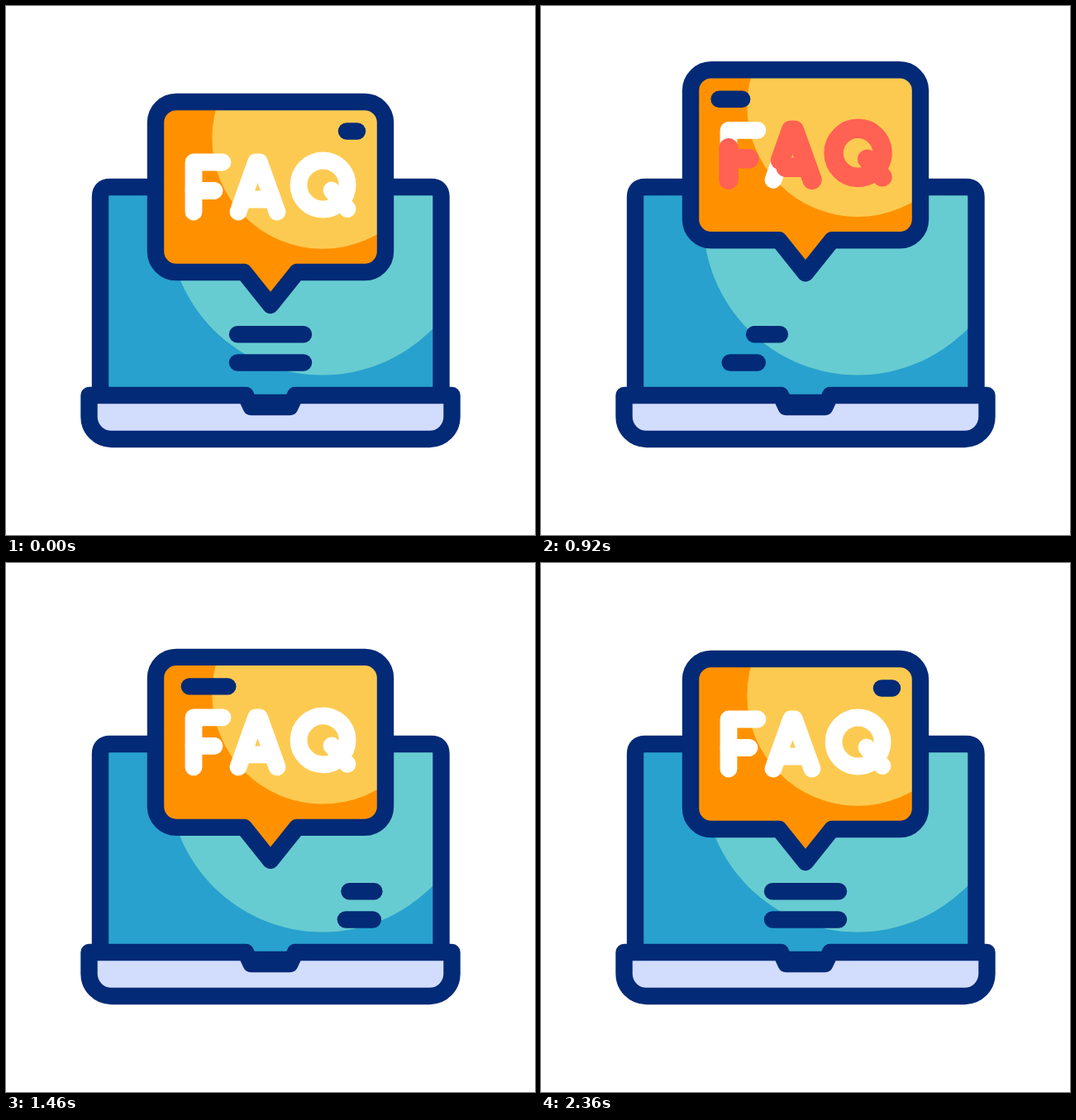
Animation, 640 px wide and 640 px high, one loop 2.4 s. Source, as an HTML page:

```html
<!DOCTYPE html>
<html lang="en">
<head>
<meta charset="utf-8">
<title>FAQ laptop</title>
<style>
  html, body { margin: 0; width: 100%; height: 100%; overflow: hidden; background: #fff; }
  svg { display: block; width: 100%; height: 100%; }
  .line { fill: none; stroke: #032a76; stroke-width: 20.4; stroke-linecap: round; stroke-linejoin: round; }
  #white, #pink { fill: none; stroke: #fff; stroke-width: 20.8; stroke-linecap: round; stroke-linejoin: round; }
  #pink { stroke: #ff6152; stroke-width: 23.4; }
</style>
</head>
<body>
<svg viewBox="0 0 640 640">
  <defs>
    <path id="screenShape" d="M114 480V231Q114 219 126 219H514.500Q526.500 219 526.500 231V480Z"/>
    <path id="bubbleShape" d="M206 116H434A25 25 0 0 1 459 141V297A25 25 0 0 1 434 322H352L320 362L288 322H206A25 25 0 0 1 181 297V141A25 25 0 0 1 206 116Z"/>
    <clipPath id="screenClip"><use href="#screenShape"/></clipPath>
    <clipPath id="bubbleClip"><use href="#bubbleShape"/></clipPath>
  </defs>

  <g clip-path="url(#screenClip)">
    <rect x="104" y="209" width="433" height="280" fill="#28a1ce"/>
    <circle cx="383" cy="260" r="186.500" fill="#67ccd1"/>
  </g>
  <use href="#screenShape" class="line"/>
  <path class="line" fill="none" style="fill:#d2dcfd"
    d="M100.500 471H290L296.500 485H343.500L350 471H539.500V497A27 27 0 0 1 512.500 524H127.500A27 27 0 0 1 100.500 497Z"/>
  <path id="line1" class="line"/>
  <path id="line2" class="line"/>

  <g id="bubble">
    <g clip-path="url(#bubbleClip)">
      <rect x="171" y="106" width="298" height="270" fill="#ff9100"/>
      <circle cx="383" cy="160" r="133.700" fill="#fdca51"/>
    </g>
    <use href="#bubbleShape" class="line"/>
    <path id="bar" class="line"/>
    <g id="white"></g>
    <g id="pink"></g>
  </g>
</svg>
<script>
const LOOP = 2400;
const byId = id => document.getElementById(id);

// Cubic bezier easing (x1, 0, x2, 1), solved by bisection.
const bezier = (x1, x2) => x => {
  let lo = 0, hi = 1, u;
  for (let i = 0; i < 24; i++) {
    u = (lo + hi) / 2;
    const v = 1 - u;
    if (3 * v * v * u * x1 + 3 * v * u * u * x2 + u * u * u < x) lo = u; else hi = u;
  }
  return u * u * (3 - 2 * u);
};
const sine = x => Math.sin(x * Math.PI / 2) ** 2;
const swift = bezier(.575, .13);
const clamp = x => Math.min(1, Math.max(0, x));

// Moves are [start, end, target, ease], in order of time.
const track = (from, ...moves) => t => moves.reduce(
  (v, [start, end, to, ease = swift]) => t <= start ? v : v + (to - v) * ease(clamp((t - start) / (end - start))),
  from);

const bubbleY = track(0,
  [200, 740, -45, bezier(.58, .5)],
  [740, 1400, -1, bezier(.55, .25)],
  [1400, 1800, -21, sine],
  [1800, 2160, 0, sine]);

const bars = [
  { el: byId("bar"), y: 151.5,
    left: track(412, [0, 1120, 212, bezier(.7, .15)], [1120, 2350, 412, bezier(.86, .31)]),
    right: track(425, [0, 1120, 239, bezier(.907, .21)], [1120, 2350, 425]) },
  { el: byId("line1"), y: 397.3,
    left: track(280, [0, 640, 218], [640, 1580, 417], [1580, 2360, 280]),
    right: track(360, [0, 640, 249], [640, 1580, 447], [1580, 2360, 360]) },
  { el: byId("line2"), y: 431.5,
    left: track(280, [100, 740, 218], [740, 1700, 418], [1700, 2360, 280]),
    right: track(360, [100, 740, 251], [740, 1700, 451], [1700, 2360, 360]) }
];

// Letter strokes: path, start of the pink head, start of its tail.
const SWEEP = 430;
const strokes = [
  ["M262 189H227V249", 320, 680],
  ["M227 223.500H252", 320, 680],
  ["M281 249L302.500 189H306.500L328 249", 430, 797],
  ["M291 234H318", 430, 797],
  ["M404.400 237.400A29.500 29.500 0 1 1 404.400 195.600A29.500 29.500 0 0 1 404.400 237.400", 540, 870],
  ["M394 223L413 245.500", 440, 870]
].map(([d, head, tail]) => {
  const add = parent => {
    const path = document.createElementNS("http://www.w3.org/2000/svg", "path");
    path.setAttribute("d", d);
    path.setAttribute("pathLength", 1);
    return byId(parent).appendChild(path);
  };
  add("white");
  return { el: add("pink"), head: track(0, [head, head + SWEEP, 1, sine]), tail: track(0, [tail, tail + SWEEP, 1, sine]) };
});

function draw(t) {
  byId("bubble").setAttribute("transform", `translate(0 ${bubbleY(t)})`);
  for (const { el, y, left, right } of bars) el.setAttribute("d", `M${left(t)} ${y}H${right(t)}`);
  for (const { el, head, tail } of strokes) {
    const a = tail(t), b = head(t);
    el.style.display = b > 0 && a < 1 ? "" : "none";
    el.setAttribute("stroke-dasharray", `${Math.max(b - a, .001)} 2`);
    el.setAttribute("stroke-dashoffset", -a);
  }
}

const begin = performance.now();
function tick() {
  draw((performance.now() - begin) % LOOP);
  requestAnimationFrame(tick);
}
tick();
</script>
</body>
</html>
```
